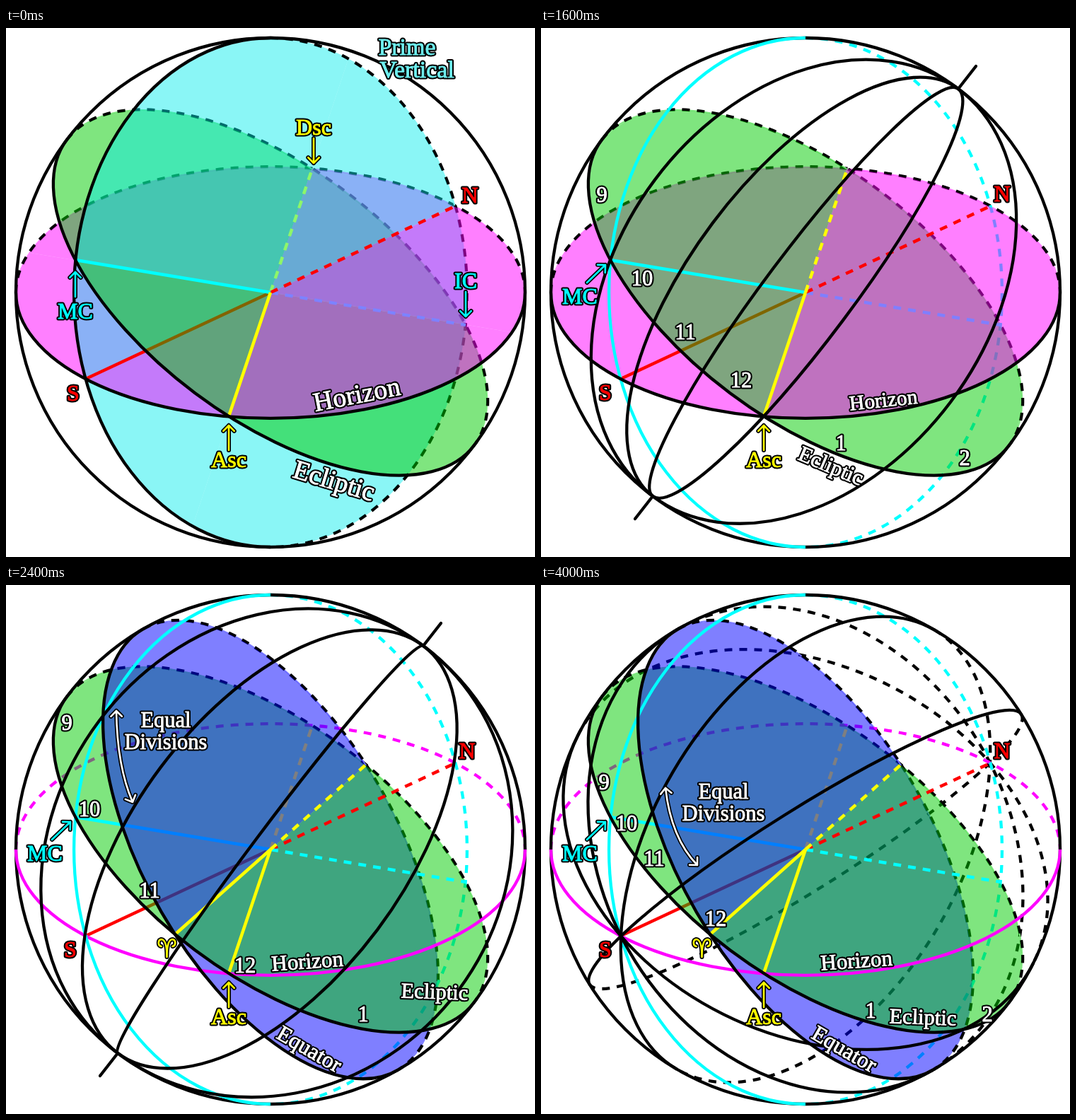
Animation, 748 px wide and 748 px high, one loop 4800 ms. Source, as an HTML page with a canvas:

```html
<!DOCTYPE html>
<html lang="en">
<head>
<meta charset="utf-8">
<title>House systems</title>
<style>
  html, body { margin: 0; width: 100%; height: 100%; overflow: hidden; background: #fff; }
  canvas { display: block; }
</style>
</head>
<body>
<canvas id="stage" width="748" height="748"></canvas>
<script>
const ctx = document.getElementById('stage').getContext('2d');
const C = 374, R = 360, TAU = Math.PI * 2, RAD = Math.PI / 180;
const RED = '#f00', CYAN = '#0ff', YELLOW = '#ff0', MAGENTA = '#f0f', WHITE = '#fff';
const DASH = [11, 10], STEP = 800;

// A great circle: tilt of its long axis in degrees, short/long axis ratio, unit normal.
function circle(tilt, ratio, fill, pale) {
  const c = Math.sqrt(1 - ratio * ratio), a = tilt * RAD;
  return { a, ratio, fill, pale, n: [Math.sin(a) * c, -Math.cos(a) * c, ratio] };
}
const horizon = circle(0, .494, 'rgba(255,0,255,.5)', '#ff80ff');
const ecliptic = circle(36.87, .494, 'rgba(0,204,0,.5)', '#80e680');
const equator = circle(60, .494, 'rgba(0,0,255,.5)', '#8080ff');
const vertical = circle(90, .772, 'rgba(0,235,235,.46)', '#8af6f6');

// Circle through both tilted poles, bulging by m pixels.
const lune = m => circle(m < 0 ? 126.87 : -53.13, Math.abs(m) / R);

// Circle through N and S, turned from the horizon by a number of degrees.
function spin(deg) {
  const c = Math.cos(deg * RAD), s = Math.sin(deg * RAD);
  let n = [.6885 * s, -.869 * c + .358 * s, .494 * c + .63 * s];
  if (n[2] < 0) n = n.map(v => -v);
  return circle(Math.atan2(n[0], -n[1]) / RAD, n[2]);
}

function stroke(color, width = 4.3, dash = []) {
  ctx.strokeStyle = color;
  ctx.lineWidth = width;
  ctx.setLineDash(dash);
  ctx.stroke();
}

function arc(c, from, r = R) {
  ctx.beginPath();
  ctx.ellipse(C, C, r, r * c.ratio, c.a, from, from + Math.PI);
}
const front = (c, color = '#000') => { arc(c, 0); stroke(color); };
const back = (c, color = '#000') => {
  if (c.pale && color === '#000') { arc(c, Math.PI, R - 1); stroke(c.pale, 2); }
  arc(c, Math.PI);
  stroke(color, 4.3, DASH);
};

// Both halves of a diameter; x, y is the end nearer to the viewer.
function diameter(color, x, y) {
  const d = [(x - C) / R, (y - C) / R];
  d.push(Math.sqrt(1 - d[0] * d[0] - d[1] * d[1]));
  return [{ color, d, dash: [] }, { color, d: d.map(v => -v), dash: DASH }];
}
const spokes = [...diameter(RED, 113, 496), ...diameter(CYAN, 98, 328), ...diameter(YELLOW, 315, 549)];
const node = diameter(YELLOW, 238, 495);

const dot = (a, b) => a[0] * b[0] + a[1] * b[1] + a[2] * b[2];
const depth = (c, a) => -(c.n[0] * Math.cos(a) + c.n[1] * Math.sin(a)) / c.n[2];

// Translucent discs cut each other along lines through the centre, so each
// wedge between those lines has its own stacking order.
function drawDiscs(discs, radii) {
  const cuts = [];
  discs.forEach((p, i) => discs.slice(i + 1).forEach(q => {
    const [a, b] = [p.n, q.n];
    const angle = Math.atan2(a[2] * b[0] - a[0] * b[2], a[1] * b[2] - a[2] * b[1]);
    cuts.push((angle + TAU) % TAU, (angle + TAU * 1.5) % TAU);
  }));
  cuts.sort((a, b) => a - b);
  for (let level = 0; level <= discs.length; level++) {
    for (const { color, d, dash } of radii) {
      if (discs.filter(c => dot(c.n, d) > -.05).length !== level) continue;
      ctx.beginPath();
      ctx.moveTo(C, C);
      ctx.lineTo(C + R * d[0], C + R * d[1]);
      stroke(color, 4.5, dash);
    }
    if (level === discs.length) break;
    cuts.forEach((from, i) => {
      const to = i + 1 < cuts.length ? cuts[i + 1] : cuts[0] + TAU;
      const mid = (from + to) / 2;
      const disc = [...discs].sort((p, q) => depth(p, mid) - depth(q, mid))[level];
      ctx.beginPath();
      ctx.moveTo(C, C);
      for (let k = 0; k <= 120; k++) {
        const a = from + (to - from) * k / 120;
        const r = (R - 2) / Math.hypot(1, depth(disc, a));
        ctx.lineTo(C + r * Math.cos(a), C + r * Math.sin(a));
      }
      ctx.fillStyle = disc.fill;
      ctx.fill();
    });
  }
}

function label(text, x, y, color = WHITE, size = 30.5, turn = 0) {
  ctx.save();
  ctx.translate(x, y);
  ctx.rotate(turn * RAD);
  ctx.font = `${size}px "Liberation Serif", "Times New Roman", serif`;
  ctx.textAlign = 'center';
  ctx.setLineDash([]);
  for (const [c, w] of [['#000', 5], [color, .9]]) {
    ctx.strokeStyle = c;
    ctx.lineWidth = w;
    ctx.strokeText(text, 0, size * .33);
  }
  ctx.fillStyle = color;
  ctx.fillText(text, 0, size * .33);
  ctx.restore();
}

function outlined(color) {
  stroke('#000', 6);
  stroke(color, 2.6);
}

function arrowHead(x, y, fromX, fromY) {
  const a = Math.atan2(y - fromY, x - fromX);
  for (const side of [-1, 1]) {
    const b = a + Math.PI + side * .78;
    ctx.moveTo(x, y);
    ctx.lineTo(x + 11 * Math.cos(b), y + 11 * Math.sin(b));
  }
}

function arrow(color, x0, y0, x1, y1, bend) {
  const [cx, cy] = bend || [(x0 + x1) / 2, (y0 + y1) / 2];
  ctx.beginPath();
  ctx.moveTo(x0, y0);
  ctx.quadraticCurveTo(cx, cy, x1, y1);
  arrowHead(x1, y1, cx, cy);
  if (bend) arrowHead(x0, y0, cx, cy);
  outlined(color);
}

function aries() {
  ctx.beginPath();
  for (const s of [-1, 1]) {
    const x = v => 227.5 + s * v;
    ctx.moveTo(x(0), 526);
    ctx.bezierCurveTo(x(0), 506, x(4), 501, x(8), 501);
    ctx.bezierCurveTo(x(13), 502, x(13), 510, x(8), 511);
  }
  outlined(YELLOW);
}

const scenes = [
  {
    discs: [horizon, ecliptic, vertical],
    words: [['Horizon', 496, 518, WHITE, 38, -11], ['Ecliptic', 464, 640, WHITE, 38, 17]],
    extra() {
      label('Prime', 567, 27, CYAN_TEXT, 34);
      label('Vertical', 581, 59, CYAN_TEXT, 34);
      label('Dsc', 435, 140, YELLOW, 32);
      label('IC', 650, 357, CYAN, 32);
      arrow(YELLOW, 435, 156, 435, 191);
      arrow(CYAN, 650, 373, 650, 408);
    }
  },
  {
    discs: [horizon, ecliptic],
    lunes: [-293.5, -144, 66, 246.5, 342],
    words: [['Horizon', 211, 514, WHITE, 31, 16], ['Ecliptic', 409, 615, WHITE, 31.5, 21]],
    numbers: [[10, 91, 215], [11, 131, 332], [12, 250, 471], [1, 410, 577], [2, 546, 611], [3, 648, 601]],
    equal: [530, 440],
    sweep: [419, 447, 566, 521, [472, 504]]
  },
  {
    discs: [horizon, ecliptic],
    lunes: [-266, -164, -57, 66, 257],
    words: [['Horizon', 484, 526, WHITE, 29.5, -6], ['Ecliptic', 410, 619, WHITE, 31, 23]],
    numbers: [[9, 86, 236], [10, 143, 354], [11, 204, 430], [12, 283, 498], [1, 424, 587], [2, 599, 608]]
  },
  {
    discs: [ecliptic, equator],
    lunes: [-303, -194, -25, 189, 332],
    words: [['Horizon', 426, 532, WHITE, 31, -4], ['Ecliptic', 606, 575, WHITE, 30.5, 2], ['Equator', 429, 656, WHITE, 31.5, 30]],
    numbers: [[9, 86, 195], [10, 118, 317], [11, 203, 432], [12, 338, 538], [1, 505, 607]],
    equal: [226, 191],
    sweep: [156, 178, 179, 307, [157, 256]]
  },
  {
    discs: [horizon, ecliptic],
    spins: [21.2, 44.8, 106.6, 147.6],
    words: [['Horizon', 446, 530, WHITE, 31, -4], ['Ecliptic', 434, 629, WHITE, 31, 14]],
    numbers: [[9, 88, 262], [10, 139, 350], [11, 198, 423], [12, 277, 492], [1, 439, 596], [2, 631, 607]],
    equal: [653, 380],
    sweep: [559, 337, 602, 505, [599, 408]]
  },
  {
    discs: [ecliptic, equator],
    spins: [26.5, 49, 93, 130.5],
    words: [['Horizon', 446, 531, WHITE, 31, -4], ['Ecliptic', 540, 611, WHITE, 30.5, 2], ['Equator', 429, 656, WHITE, 31.5, 30]],
    numbers: [[9, 89, 279], [10, 121, 337], [11, 160, 387], [12, 247, 472], [1, 466, 602], [2, 631, 607]],
    equal: [258, 292],
    sweep: [176, 287, 221, 396, [184, 358]]
  }
];
const CYAN_TEXT = '#6ff0f0';

function draw(index) {
  const { discs, lunes = [], spins = [], words, numbers = [], equal, sweep, extra } = scenes[index];
  const intro = index === 0, tilted = discs.includes(equator);
  const turned = spins.map(spin), cusps = lunes.map(lune);
  ctx.fillStyle = WHITE;
  ctx.fillRect(0, 0, 748, 748);
  ctx.lineCap = 'butt';
  ctx.lineJoin = 'round';

  turned.forEach(c => back(c));
  discs.forEach(c => back(c));
  if (tilted) back(horizon, MAGENTA);
  if (!intro) back(vertical, CYAN);
  drawDiscs(discs, tilted ? [...spokes, ...node] : spokes);

  ctx.beginPath();
  ctx.arc(C, C, R, 0, TAU);
  stroke('#000');
  if (tilted) front(horizon, MAGENTA);
  if (!intro) front(vertical, CYAN);
  [...discs, ...cusps, ...turned].forEach(c => front(c));

  ctx.lineCap = 'round';
  if (lunes.length) {
    ctx.beginPath();
    for (const s of [-1, 1]) {
      ctx.moveTo(C + s * 216, C - s * 288);
      ctx.lineTo(C + s * 241, C - s * 320);
    }
    stroke('#000');
  }

  arrow(YELLOW, 315, 597, 315, 562);
  label('Asc', 315, 610, YELLOW, 32);
  if (intro) arrow(CYAN, 98, 380, 98, 345);
  else arrow(CYAN, 65, 360, 91, 335);
  label('MC', ...(intro ? [98, 400] : [55, 379]), CYAN, 32);
  label('N', ...(intro ? [656, 236] : [652, 234]), RED, 32);
  label('S', ...(intro ? [95, 516] : [91, 515]), RED, 32);
  if (tilted) aries();
  if (sweep) arrow(WHITE, ...sweep);
  if (equal) {
    label('Equal', equal[0], equal[1]);
    label('Divisions', equal[0], equal[1] + 31);
  }
  words.forEach(w => label(...w));
  numbers.forEach(n => label(...n));
  if (extra) extra();
}

let shown = -1;
function tick() {
  const index = Math.floor(performance.now() / STEP) % scenes.length;
  if (index !== shown) draw(shown = index);
  requestAnimationFrame(tick);
}
tick();
</script>
</body>
</html>
```
